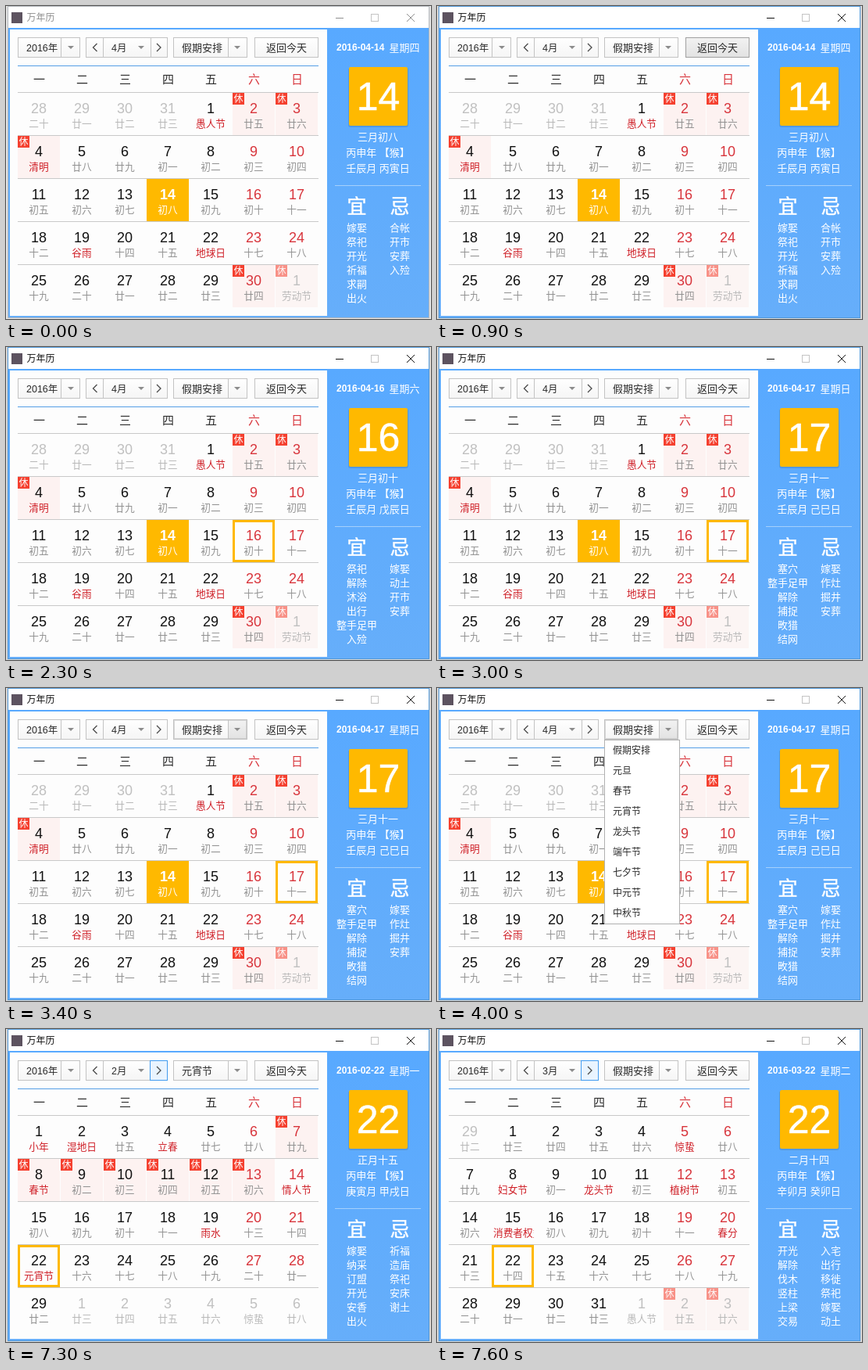
These frames come from a looping animation (544 by 400 pixels, 8 s). An HTML page:

```html
<!DOCTYPE html>
<html lang="zh-CN">
<head>
<meta charset="utf-8">
<title>万年历</title>
<style>
  html, body { margin: 0; width: 100%; height: 100%; overflow: hidden; background: #e2e2e2; }
  #stage { display: block; width: 544px; height: 400px; }
  text { font-family: "Liberation Sans", "Noto Sans CJK SC", "Noto Sans CJK", sans-serif; white-space: pre; }
</style>
</head>
<body>
<svg id="stage" viewBox="0 0 544 400"></svg>
<script>
const LOOP = 8000;
const GOLD = '#ffb900', RED = '#d8353c', INK = '#2b2b2b', LINE = '#c3c3c3';

// Each step changes part of the state at its time.
const steps = [
  [0, { active: false, press: 0, rings: [], month: 4, day: 14, combo: '假期安排', glow: 0, open: false, next: false }],
  [600, { press: 0.5 }],
  [900, { active: true, press: 1 }],
  [1000, { press: 0.6 }],
  [1100, { press: 0.25 }],
  [1200, { press: 0, rings: [15] }],
  [1600, { day: 15 }],
  [1700, { rings: [15, 16] }],
  [2300, { day: 16, rings: [16] }],
  [2600, { rings: [16, 17] }],
  [3000, { day: 17, rings: [17] }],
  [3100, { glow: 0.25 }],
  [3200, { glow: 0.5 }],
  [3300, { glow: 0.75 }],
  [3400, { glow: 1 }],
  [4000, { open: true }],
  [6400, { open: false, glow: 0, month: 2, day: 22, combo: '元宵节', rings: [22, 5] }],
  [6900, { rings: [22, 4] }],
  [7000, { rings: [22] }],
  [7300, { next: true }],
  [7600, { month: 3, combo: '假期安排' }]
];

const festivals = {
  '2-1': '小年', '2-2': '湿地日', '2-4': '立春', '2-8': '春节', '2-14': '情人节', '2-19': '雨水', '2-22': '元宵节',
  '3-5': '惊蛰', '3-8': '妇女节', '3-10': '龙头节', '3-12': '植树节', '3-15': '消费者权益日', '3-20': '春分',
  '4-1': '愚人节', '4-4': '清明', '4-19': '谷雨', '4-22': '地球日', '5-1': '劳动节'
};
const daysOff = '2-7 2-8 2-9 2-10 2-11 2-12 2-13 4-2 4-3 4-4 4-30 5-1'.split(' ');
const menu = ['假期安排', '元旦', '春节', '元宵节', '龙头节', '端午节', '七夕节', '中元节', '中秋节'];
const advice = {
  '4-14': ['嫁娶 祭祀 开光 祈福 求嗣 出火', '合帐 开市 安葬 入殓'],
  '4-15': ['安床 伐木 拆卸 修造 动土 上梁', '嫁娶 祭祀 开光 出行 出火 移徙'],
  '4-16': ['祭祀 解除 沐浴 出行 整手足甲 入殓', '嫁娶 动土 开市 安葬'],
  '4-17': ['塞穴 整手足甲 解除 捕捉 畋猎 结网', '嫁娶 作灶 掘井 安葬'],
  '2-22': ['嫁娶 纳采 订盟 开光 安香 出火', '祈福 造庙 祭祀 安床 谢土'],
  '3-22': ['开光 解除 伐木 竖柱 上梁 交易', '入宅 出行 移徙 祭祀 嫁娶 动土']
};

// Calendar arithmetic in whole days.
const dayNo = (m, d) => Date.UTC(2016, m - 1, d) / 864e5;
const newMoons = [dayNo(1, 10), dayNo(2, 8), dayNo(3, 9), dayNo(4, 7)];
const weekday = n => (n + 3) % 7;

function lunar(n) {
  const i = newMoons.filter(x => x <= n).length - 1;
  const d = n - newMoons[i] + 1;
  const name = d % 10
    ? '初十廿'[Math.floor(d / 10)] + '一二三四五六七八九'[d % 10 - 1]
    : ['初十', '二十', '三十'][d / 10 - 1];
  return { month: '腊正二三'[i] + '月', name };
}

function dayPillar(n) {
  const i = n - dayNo(4, 14) + 62;
  return '甲乙丙丁戊己庚辛壬癸'[i % 10] + '子丑寅卯辰巳午未申酉戌亥'[i % 12];
}

// SVG helpers; text is placed by its vertical centre.
const rect = (x, y, w, h, fill, more = '') =>
  `<rect x="${x}" y="${y}" width="${w}" height="${h}" fill="${fill}" ${more}/>`;
const frame = (x, y, w, h, stroke, fill = 'none', more = '') =>
  rect(x + 0.5, y + 0.5, w - 1, h - 1, fill, `stroke="${stroke}" ${more}`);
const path = (d, stroke, more = '') => `<path d="${d}" fill="none" stroke="${stroke}" ${more}/>`;
const text = (s, x, y, size, fill, anchor = 'middle', more = '') =>
  `<text x="${x}" y="${y + size * 0.37}" font-size="${size}" fill="${fill}" text-anchor="${anchor}" ${more}>${s}</text>`;
const arrow = x => `<path d="M${x - 4} 51h8l-4 4z" fill="#8c8c8c"/>`;
const chevron = (x, dx) => path(`M${x} 48l${dx} 5l${-dx} 5`, '#4a4a4a', 'stroke-width="1.3"');

const defs = `<defs>
  <linearGradient id="face" x2="0" y2="1"><stop stop-color="#fff"/><stop offset="1" stop-color="#f5f5f5"/></linearGradient>
  <linearGradient id="down" x2="0" y2="1"><stop stop-color="#f2f2f2"/><stop offset="1" stop-color="#e2e2e2"/></linearGradient>
  <linearGradient id="sky" x2="0" y2="1"><stop stop-color="#58a9ff"/><stop offset="1" stop-color="#66aefa"/></linearGradient>
</defs>`;

function chrome(s) {
  const ink = s.active ? '#111' : '#8f8f8f';
  return rect(0, 0, 544, 400, s.active ? '#d6d6d6' : '#e2e2e2') +
    rect(2, 0, 540, 399, '#fff') +
    rect(2, 28, 540, 371, 'url(#sky)') +
    rect(5, 30, 406, 366, '#fdfdfd') +
    frame(2, 0, 540, 399, s.active ? '#4f97d8' : '#b4b8bd') +
    rect(7, 8, 14, 14, '#5d5360') +
    text('万年历', 26.5, 14.5, 12, ink, 'start') +
    path('M422 15.5h10', ink) +
    frame(467, 10, 10, 10, '#c4c4c4') +
    path('M513 10l10 10m0 -10l-10 10', ink);
}

function toolbar(s) {
  return frame(15, 40, 80, 26, LINE, 'url(#face)') + path('M70.5 41v24', LINE) +
    text('2016年', 26, 53, 12.5, INK, 'start') + arrow(83) +
    frame(102, 40, 105, 26, LINE, 'url(#face)') + path('M124.5 41v24M185.5 41v24', LINE) +
    text(s.month + '月', 135, 53, 12.5, INK, 'start') + arrow(173) +
    (s.next ? frame(184, 40, 23, 26, '#429cf0', '#e9f4ff') : '') +
    chevron(116.5, -5) + chevron(193, 5) +
    frame(214, 40, 95, 26, LINE, 'url(#face)') +
    rect(285, 41, 23, 24, 'url(#down)', `opacity="${s.glow}"`) +
    frame(215, 41, 93, 24, '#b5b5b5', 'none', `opacity="${s.glow * 0.5}"`) +
    path('M284.5 41v24', LINE) +
    text(s.combo, 225, 53, 13, INK, 'start') + arrow(296) +
    frame(318, 40, 82, 26, LINE, 'url(#face)') +
    frame(318, 40, 82, 26, '#a0a0a0', 'url(#down)', `opacity="${s.press}"`) +
    text('返回今天', 359, 53, 13, INK);
}

function cell(n, i, s) {
  const date = new Date(n * 864e5);
  const m = date.getUTCMonth() + 1, d = date.getUTCDate(), key = m + '-' + d;
  const dim = m !== s.month, today = key === '4-14', off = daysOff.includes(key);
  const feast = festivals[key], note = feast || lunar(n).name;
  const ink = dim ? '#c0c0c0' : today ? '#fff' : i % 7 > 4 ? RED : '#111';
  const noteInk = dim ? '#b9b9b9' : today ? '#fff' : feast ? '#cf1f27' : '#929292';
  const wide = note.length > 4;
  let out = '';
  if (off) out += rect(0, 0, 54, 54, dim ? '#fcf5f4' : '#fdf2f1');
  if (today) out += rect(0, 0, 54, 54, GOLD);
  out += text(d, 27, 19.3, 18, ink, 'middle', today ? 'font-weight="bold"' : '') +
    text(note, wide ? 2 : 27, 39, 12.7, noteInk, wide ? 'start' : 'middle');
  if (off) {
    out += `<g opacity="${dim ? 0.55 : 1}">` + rect(0, 0, 15, 15, '#f5402f') + text('休', 7.5, 7.5, 12, '#fff') + '</g>';
  }
  if (!dim && s.rings.includes(d)) out += rect(1.5, 1.5, 51, 51, 'none', `stroke="${GOLD}" stroke-width="3"`);
  const x = 15 + 55 * (i % 7), y = 111 + 55 * Math.floor(i / 7);
  return `<svg x="${x}" y="${y}" width="54" height="54">${out}</svg>`;
}

function grid(s) {
  let out = rect(15, 76, 385, 1, '#559fe6');
  [...'一二三四五六日'].forEach((c, i) => {
    out += text(c, 42.5 + 55 * i, 93, 15, i > 4 ? RED : INK);
  });
  for (let r = 0; r < 5; r++) out += rect(15, 110 + 55 * r, 385, 1, '#c9c9c9');
  const first = dayNo(s.month, 1), start = first - weekday(first);
  for (let i = 0; i < 35; i++) out += cell(start + i, i, s);
  return out;
}

function panel(s) {
  const n = dayNo(s.month, s.day), moon = lunar(n), white = '#fff';
  const heavy = 'stroke="#fff" stroke-width=".5"';
  const date = `2016-0${s.month}-${s.day}`;
  const pillar = { 2: '庚寅', 3: '辛卯', 4: '壬辰' }[s.month];
  let out = text(date, 423, 53, 12, white, 'start', 'font-weight="bold"') +
    text('星期' + '一二三四五六日'[weekday(n)], 490.5, 53, 13, white, 'start') +
    rect(438, 79, 77, 76, '#3d7dbd', 'rx="3" opacity=".4"') +
    rect(439, 78, 75, 75, GOLD, 'rx="2"') +
    text(s.day, 476.5, 114.5, 50, white, 'middle', heavy) +
    text(moon.month + moon.name, 476, 167, 13, white) +
    text('丙申年 【猴】', 476, 187, 13, white) +
    text(`${pillar}月 ${dayPillar(n)}日`, 476, 207, 13, white) +
    rect(421, 229, 110, 1, '#a5d0fb');
  advice[s.month + '-' + s.day].forEach((list, col) => {
    const x = 449 + 55 * col;
    out += text('宜忌'[col], x, 256, 25, white, 'middle', heavy);
    list.split(' ').forEach((word, i) => { out += text(word, x, 283 + 18 * i, 13, white); });
  });
  return out;
}

function dropdown() {
  return frame(214, 66, 97, 236, '#b0b0b0', '#fff') +
    menu.map((name, i) => text(name, 225, 80 + 26 * i, 12, INK, 'start')).join('');
}

const stage = document.getElementById('stage');
let shown = -1;

function draw() {
  const t = performance.now() % LOOP;
  const count = steps.filter(step => step[0] <= t).length;
  if (count !== shown) {
    shown = count;
    const s = Object.assign({}, ...steps.slice(0, count).map(step => step[1]));
    stage.innerHTML = defs + chrome(s) + toolbar(s) + grid(s) + panel(s) + (s.open ? dropdown() : '');
  }
  requestAnimationFrame(draw);
}
draw();
</script>
</body>
</html>
```
